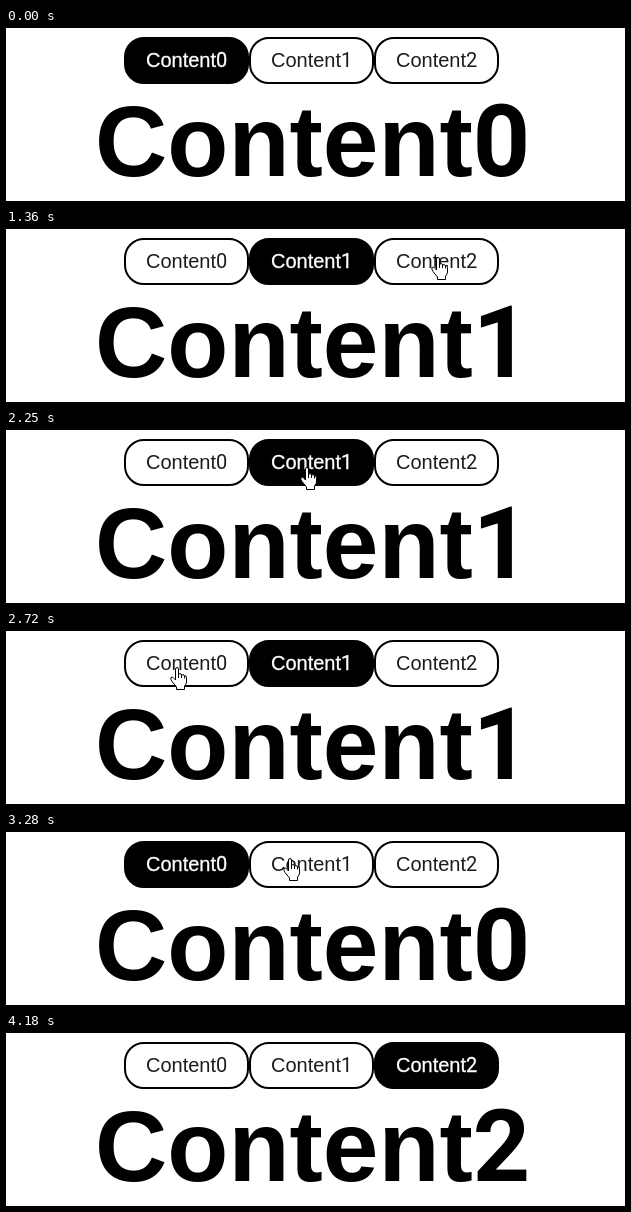
Animation of 619x173 px, one loop 4540 ms. Source, as an HTML page:

```html
<!DOCTYPE html>
<html lang="en">
<head>
<meta charset="utf-8">
<title>Tabs</title>
<style>
  html, body { margin: 0; width: 100%; height: 100%; overflow: hidden; background: #fff; }
  svg { display: block; width: 619px; height: 173px; background: #fff; isolation: isolate; }
  text { font-family: Arial, "Liberation Sans", sans-serif; }
  .digit { font-family: Roboto, Arial, sans-serif; }
  .tab rect { fill: #fff; stroke: #000; stroke-width: 2; }
  .tab text { font-size: 20px; fill: #1c1c1c; }
  .tab.on rect { fill: #000; }
  .tab.on text { fill: #fff; stroke: #fff; stroke-width: .3; }
  #title { font-size: 100px; font-weight: bold; }
  #hand, #arrow { fill: #fff; stroke: #000; stroke-linejoin: round; }
  #beam { fill: none; stroke: #fff; mix-blend-mode: difference; }
</style>
</head>
<body>
<svg viewBox="0 0 619 173">
  <g id="tabs"></g>
  <text id="title" x="89.1" y="148">Content<tspan id="digit" class="digit"></tspan></text>
  <path id="beam" d="M-4 -7.5H4M.5 -7V7M-4 7.5H4"/>
  <path id="hand" d="M-1.5 12V1Q-1.5 -.5 0 -.5T1.5 1V6Q4.5 4.8 4.5 7Q7.5 5.8 7.5 8Q9.5 7.3 9.5 9.5V14Q9.5 16 7.5 18V21.5H-.5V19L-5 13.5Q-6.8 10.8 -6 9.5Q-4.5 8 -3 10.5ZM1.5 6V10M4.5 7V10M7.5 8V10.5"/>
  <path id="arrow" d="M.5 .5V16.5L4.2 13L6.8 18.5L9 17.5L6.6 12H11.5Z"/>
</svg>
<script>
const LOOP = 4540, START = 270, END = 4180;
const STEP = 66.5;                          // screen refresh
const LEFT = 118, WIDTH = 125, BOTTOM = 56; // tab row

// pointer stops; a stop on a tab clicks it shortly before leaving
const stops = [
  { from: START, to: START, x: 462, y: 140 },
  { from: 670, to: 740, x: 319, y: 58 },
  { from: 870, to: 1000, x: 304, y: 37 },
  { from: 1330, to: 1690, x: 432, y: 29 },
  { from: 2090, to: 2260, x: 301, y: 38 },
  { from: 2640, to: 2830, x: 171, y: 37 },
  { from: 2950, to: 3355, x: 284, y: 27 },
  { from: 3600, to: 3925, x: 428, y: 25 },
  { from: END, to: LOOP, x: 540, y: 185 }
];
const clicks = stops.filter(s => s.y < BOTTOM).map(s => ({
  at: s.to - 70,
  tab: Math.floor((s.x - LEFT) / WIDTH)
}));

const $ = id => document.getElementById(id);
const cursors = ["hand", "beam", "arrow"].map($);

$("tabs").innerHTML = [0, 1, 2].map(i => `<g class="tab">
  <rect x="${LEFT + 1 + WIDTH * i}" y="10" width="${WIDTH - 2}" height="45" rx="19"/>
  <text x="${LEFT + 22 + WIDTH * i}" y="39">Content<tspan class="digit">${i}</tspan></text>
</g>`).join("");
const tabs = [...document.querySelectorAll(".tab")];

const smooth = k => k * k * (3 - 2 * k);

function pointer(t) {
  const i = stops.findIndex(s => s.from > t);
  const a = stops[i - 1], b = stops[i];
  const k = smooth(Math.max(0, (t - a.to) / (b.from - a.to)));
  const mix = (p, q) => Math.round(p + (q - p) * k);
  return [mix(a.x, b.x), mix(a.y, b.y)];
}

function render(ms) {
  const t = START + Math.floor((ms - START) / STEP) * STEP;
  const active = clicks.reduce((tab, c) => c.at <= t ? c.tab : tab, 0);
  tabs.forEach((tab, i) => tab.classList.toggle("on", i === active));
  $("digit").textContent = active;

  let kind = -1, x = 0, y = 0;
  if (ms >= START && ms < END) {
    [x, y] = pointer(t);
    kind = y < BOTTOM ? 0 : x < 515 ? 1 : 2;
  }
  cursors.forEach((c, i) => {
    c.style.display = i === kind ? "" : "none";
    c.setAttribute("transform", `translate(${x} ${y})`);
  });
}

const begin = performance.now();
function tick() {
  render((performance.now() - begin) % LOOP);
  requestAnimationFrame(tick);
}
tick();
</script>
</body>
</html>
```
